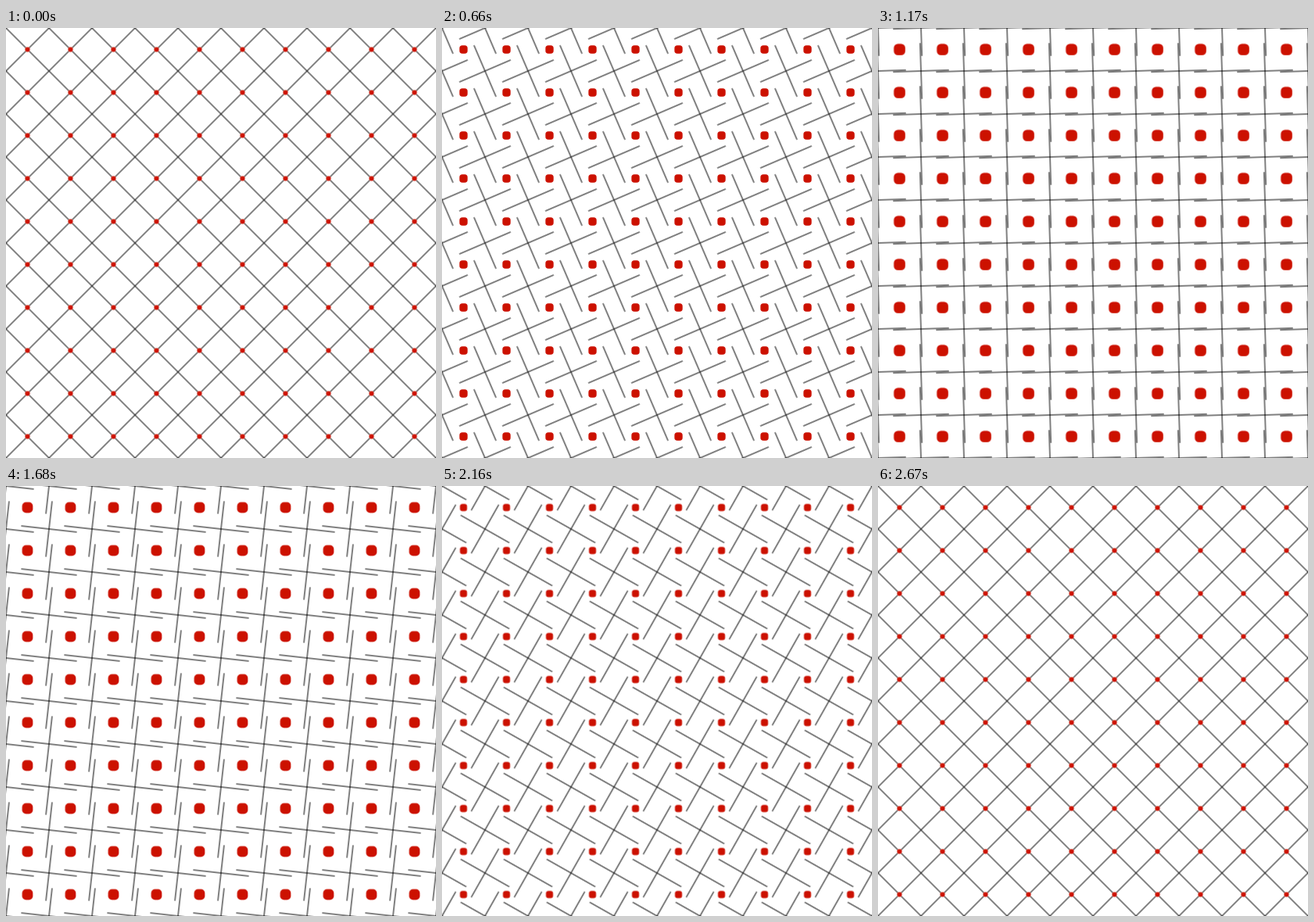
An HTML page for the animation above (2.7 s loop, 550x550 px).

```html
<!DOCTYPE html>
<html lang="en">
<head>
<meta charset="utf-8">
<title>Turning lattice</title>
<style>
  html, body { margin: 0; width: 100%; height: 100%; overflow: hidden; background: #fff; }
  svg { display: block; width: 550px; height: 550px; }

  /* The easing is a close fit to half a cosine wave. */
  .cross, .dot {
    transform-origin: 0 0;
    animation: turn 2700ms cubic-bezier(.3642, 0, .6358, 1) infinite;
  }
  .cross { fill: none; stroke: #000; stroke-width: 1; }
  .dot { fill: #cc1100; animation-name: swell; }

  @keyframes turn {
    0%   { transform: rotate(-45deg); }
    50%  { transform: rotate(0deg); }
    100% { transform: rotate(45deg); }
  }
  @keyframes swell {
    0%, 100% { transform: scale(.4); }
    50%      { transform: scale(1); }
  }
</style>
</head>
<body>
<svg id="stage" viewBox="0 0 550 550"></svg>
<script>
  const CELL = 55, COUNT = 10, ARM = 35.75, DOT = 7.5;

  function grid(size, offset, shape) {
    let out = '';
    for (let row = 0; row < size; row++) {
      for (let col = 0; col < size; col++) {
        const x = col * CELL + offset, y = row * CELL + offset;
        out += `<g transform="translate(${x} ${y})">${shape}</g>`;
      }
    }
    return out;
  }

  const cross = `<path class="cross" d="M${-ARM} 0H${ARM}M0 ${-ARM}V${ARM}"/>`;
  const dot = `<rect class="dot" x="${-DOT}" y="${-DOT}" width="${2 * DOT}" height="${2 * DOT}" rx="${DOT * 0.72}"/>`;

  document.getElementById('stage').innerHTML =
    grid(COUNT + 1, 0, cross) + grid(COUNT, CELL / 2, dot);
</script>
</body>
</html>
```
